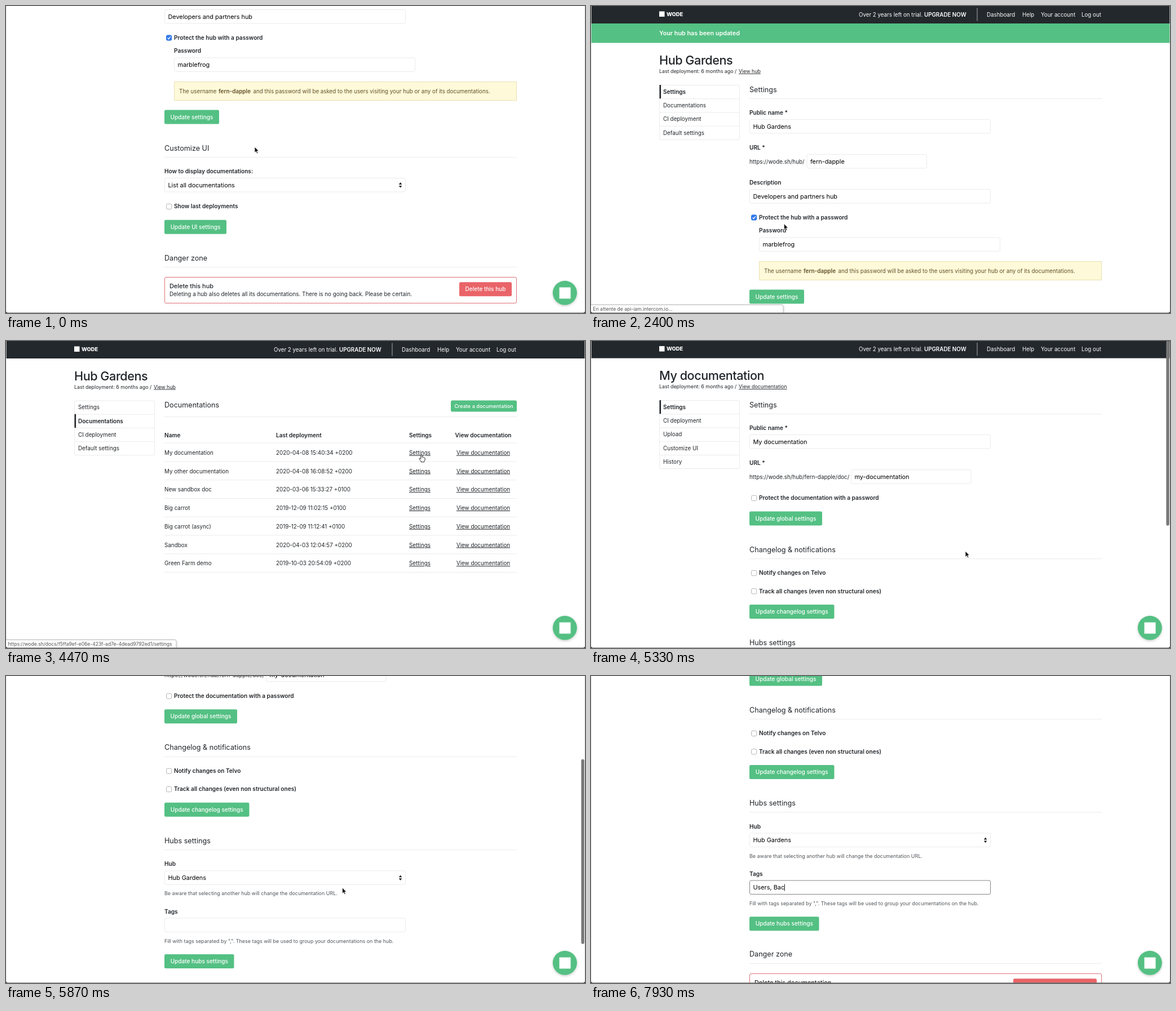
Animation of 1027 by 545 pixels, one loop 8 s. Source, as an HTML page:

```html
<!DOCTYPE html>
<html lang="en">
<head>
<meta charset="utf-8">
<title>Hub settings</title>
<style>
html, body { margin: 0; width: 100%; height: 100%; overflow: hidden; background: #fff; }
svg { display: block; width: 1027px; height: 545px; font-family: Inter, "Open Sans", sans-serif; font-optical-sizing: none; }
text { white-space: pre; fill: #212529; }
.cell { font-size: 9.85px; }
.field { font-size: 10.9px; fill: #000; }
.label { font-size: 10.15px; font-weight: 600; }
.head { font-size: 10.05px; font-weight: 600; }
.h1 { font-size: 21.6px; font-weight: 500; letter-spacing: -.45px; }
.h2 { font-size: 12.6px; }
.h3 { font-size: 10.9px; font-weight: 500; }
.sub { font-size: 8.85px; }
.hint { font-size: 8.95px; fill: #50565b; }
.note { font-size: 9.78px; fill: #62512a; }
.noteb { font-size: 9.95px; fill: #62512a; font-weight: 600; }
.body { font-size: 9.83px; }
.btn { font-size: 10.05px; font-weight: 500; fill: #fff; }
.mini { font-size: 9.13px; font-weight: 500; fill: #fff; }
.nav { font-size: 9.75px; fill: #fff; }
.navb { font-size: 9.8px; font-weight: 600; fill: #fff; }
.flash { font-size: 10.8px; font-weight: 600; fill: #fff; }
.brand { font-size: 9.4px; font-weight: 800; fill: #fff; }
.status { font-size: 8.55px; fill: #555; }
.u { text-decoration: underline; }
</style>
</head>
<body>
<svg id="stage" viewBox="0 0 1027 545"></svg>
<script>
const LOOP = 8000;
const GREEN = '#54c083', RED = '#e96468', LINE = '#ebebeb';
const HUB = 'Hub Gardens', SLUG = 'fern-dapple', SITE = 'https://wode.sh/';
const SIZE = { cell: 9.85, field: 10.9, label: 10.15, head: 10.05, h1: 21.6, h2: 12.6, h3: 10.9, sub: 8.85, hint: 8.95,
  note: 9.78, noteb: 9.95, body: 9.83, btn: 10.05, mini: 9.13, nav: 9.75, navb: 9.8, flash: 10.8, brand: 9.4, status: 8.55 };

const esc = s => s.replace(/&/g, '&amp;');

// y is the middle of the capitals
const text = (x, y, cls, s, extra = '') =>
  `<text x="${x}" y="${y + SIZE[cls.split(' ')[0]] * .364}" class="${cls}" ${extra}>${esc(s)}</text>`;
const box = (x, y, w, h, fill, extra = '') =>
  `<rect x="${x}" y="${y}" width="${w}" height="${h}" fill="${fill}" ${extra}/>`;
const rule = (y, x = 281, w = 625) => box(x, y, w, 1, LINE);
const frame = (x, y, w, h, id = '') =>
  box(x + .5, y + .5, w - 1, h - 1, '#fff', `rx="2.5" stroke="${LINE}" ${id && `id="${id}"`}`);
const input = (x, y, w, s, id) => frame(x, y, w, 25.5, id) + text(x + 6.4, y + 12.9, 'field', s, id ? `id="${id}Text"` : '');
const select = (y, s, id) => input(281, y, 428, s, id) +
  `<path d="M696.8 ${y + 11.9}h5.6l-2.8-3.8zM696.8 ${y + 13.9}h5.6l-2.8 3.8z" fill="#222"/>`;
const button = (x, y, w, s, { h = 25, fill = GREEN, cls = 'btn', id = '' } = {}) =>
  box(x, y, w, h, fill, `rx="2.5" ${id && `id="${id}"`}`) +
  text(x + w / 2, y + h / 2, cls, s, 'text-anchor="middle"');
const check = (y, s, on) => box(284.5, y - 4.3, 9.2, 9.2, on ? '#2f78e8' : '#fff', `rx="2" stroke="${on ? '#2f78e8' : '#b5b5b5'}"`) +
  (on ? `<path d="M286.6 ${y + .3}l1.9 2.2 3.4-4.6" fill="none" stroke="#fff" stroke-width="1.3"/>` : '') +
  text(298, y, 'label', s);
const section = (y, s) => text(281, y, 'h2', s) + rule(y + 16);

const header = () => box(0, 0, 1027, 31, '#23282c') + box(121, 9.5, 9.5, 9.5, '#fff') +
  text(134, 14.3, 'brand', 'WODE') +
  text(475, 15, 'nav', 'Over 2 years left on trial.') + text(591, 15, 'navb', 'UPGRADE NOW') +
  box(684.5, 3.5, 1, 23, '#a9acae') +
  text(702, 15, 'nav', 'Dashboard') + text(765, 15, 'nav', 'Help') +
  text(798, 15, 'nav', 'Your account') + text(870, 15, 'nav', 'Log out');

const title = (y, name, link) => text(121, y, 'h1', name) +
  text(121, y + 19.7, 'sub', 'Last deployment: 6 months ago /') + text(262, y + 19.7, 'sub u', link);

const sidebar = (y, items, active) => frame(121, y, 143, items.length * 24.25 + .8) + items.map((s, i) => {
  const top = y + i * 24.25, on = i === active;
  return (i ? rule(top, 122, 141) : '') + (on ? box(121.5, top, 2.6, 24.5, '#212529') : '') +
    text(128, top + 12.3, on ? 'head' : 'cell', s);
}).join('');

const danger = (y, s, x, w, more) => section(y, 'Danger zone') +
  box(281.5, y + 34.5, 624, 46, '#fff', 'rx="2.5" stroke="#de7176"') +
  text(290, y + 50, 'h3', s) + text(290, y + 64.7, 'body', more) +
  button(x, y + 43.3, w, s, { fill: RED });

const WARN = 'documentations. There is no going back. Please be certain.';

const hubPage = () => header() + box(0, 31, 1027, 34.5, GREEN) +
  text(121, 48.5, 'flash', 'Your hub has been updated') +
  title(96, HUB, 'View hub') +
  sidebar(140, ['Settings', 'Documentations', 'CI deployment', 'Default settings'], 0) +
  box(121.8, 162.2, 146, 28.5, 'none', 'id="ring" stroke="#777" stroke-width="2.2"') +
  section(148, 'Settings') +
  text(281, 189.3, 'label', 'Public name *') + input(281, 201, 428, HUB) +
  text(281, 251.5, 'label', 'URL *') + text(281, 276, 'cell', SITE + 'hub/') + input(382.5, 263, 213.5, SLUG) +
  text(281, 313.3, 'label', 'Description') + input(281, 325, 428, 'Developers and partners hub') +
  check(375.2, 'Protect the hub with a password', true) +
  text(298, 398.7, 'label', 'Password') + input(298, 410.4, 428, 'marblefrog') +
  box(298.5, 453.5, 607, 33, '#fef9d8', 'stroke="#e9e0b4"') +
  text(307, 470, 'note', 'The username') + text(377, 470, 'noteb', SLUG) +
  text(438.6, 470, 'note', 'and this password will be asked to the users visiting your hub or any of its documentations.') +
  button(281, 503.4, 97, 'Update settings') +
  section(571, 'Customize UI') +
  text(281, 612.5, 'label', 'How to display documentations:') + select(624, 'List all documentations', 'display') +
  check(674.7, 'Show last deployments', false) +
  button(281, 698.7, 110, 'Update UI settings', { id: 'save' }) +
  danger(766, 'Delete this hub', 804, 93, 'Deleting a hub also deletes all its ' + WARN);

const ROWS = [
  ['My documentation', '2020-04-08 15:40:34 +0200'],
  ['My other documentation', '2020-04-08 16:08:52 +0200'],
  ['New sandbox doc', '2020-03-06 15:33:27 +0100'],
  ['Big carrot', '2019-12-09 11:02:15 +0100'],
  ['Big carrot (async)', '2019-12-09 11:12:41 +0100'],
  ['Sandbox', '2020-04-03 12:04:57 +0200'],
  ['Green Farm demo', '2019-10-03 20:54:09 +0200'],
];
const MID = 'text-anchor="middle"';

const listPage = () => header() + title(61.7, HUB, 'View hub') +
  sidebar(105.5, ['Settings', 'Documentations', 'CI deployment', 'Default settings'], 1) +
  text(281, 113.7, 'h2', 'Documentations') + rule(134) +
  button(789, 105.5, 117, 'Create a documentation', { h: 20, cls: 'mini' }) +
  text(281, 167, 'head', 'Name') + text(479, 167, 'head', 'Last deployment') +
  text(715, 167, 'head', 'Settings') + text(846.5, 167, 'head', 'View documentation', MID) + rule(180.5) +
  ROWS.map(([name, date], i) => {
    const y = 198.2 + i * 32.75;
    return text(281, y, 'cell', name) + text(479, y, 'cell', date) + text(715, y, 'cell u', 'Settings') +
      text(846.5, y, 'cell u', 'View documentation', MID) + rule(y + 15.3);
  }).join('');

const docPage = () => header() + title(61.7, 'My documentation', 'View documentation') +
  sidebar(105.5, ['Settings', 'CI deployment', 'Upload', 'Customize UI', 'History'], 0) +
  section(113.5, 'Settings') +
  text(281, 155.2, 'label', 'Public name *') + input(281, 166.4, 428, 'My documentation') +
  text(281, 217.2, 'label', 'URL *') + text(281, 242, 'cell', `${SITE}hub/${SLUG}/doc/`) +
  input(461, 228.6, 213.5, 'my-documentation') +
  check(279, 'Protect the documentation with a password', false) +
  button(281, 303, 129, 'Update global settings') +
  section(370.6, 'Changelog & notifications') +
  check(412.2, 'Notify changes on Telvo', false) +
  check(444.5, 'Track all changes (even non structural ones)', false) +
  button(281, 468.4, 150.5, 'Update changelog settings') +
  section(535.8, 'Hubs settings') +
  text(281, 577.5, 'label', 'Hub') + select(589, HUB) +
  text(281, 629.8, 'hint', 'Be aware that selecting another hub will change the documentation URL.') +
  text(281, 661.6, 'label', 'Tags') + input(281, 673, 428, '', 'tags') +
  box(287, 680, 1, 12, '#000', 'id="caret"') +
  text(281, 714, 'hint', 'Fill with tags separated by ",". These tags will be used to group your documentations on the hub.') +
  button(281, 737.7, 123.5, 'Update hubs settings') +
  danger(804.4, 'Delete this documentation', 749, 148, 'Deleting a documentation is definitive. There is no going back.');

const OPTIONS = ['List all documentations', 'Group documentations by tag'];
const popup = () => `<g id="popup">` +
  box(273, 306, 431.5, 46, '#f2f2f2', 'rx="4.5" stroke="#c9c9c9" stroke-width=".7" filter="url(#soft)"') +
  box(273, 310, 431.5, 19, '#2f7bf0', 'id="pick"') +
  OPTIONS.map((s, i) => text(287.4, 319 + i * 19, 'field', s, `id="opt${i}"`)).join('') +
  `<path id="tick" d="M277.5 319l2.2 3 4-6.6" fill="none" stroke="#fff" stroke-width="1.4"/></g>`;

const overlay = () => `<rect id="thumb" x="1020.3" width="5.4" height="328" rx="2.7" fill="#787878"/>
  <g id="chat"><circle cx="991.3" cy="509.3" r="21.5" fill="${GREEN}" filter="url(#soft)"/>${box(981.5, 499.5, 20, 20, '#fff')}</g>` +
  box(0, 0, .8, 545, '#dcdcdc') + box(1026.3, 0, .7, 545, '#dcdcdc') +
  `<g id="status">${box(-3, 530.5, 344, 20, '#fff', 'id="bar" rx="2.5" stroke="#b9b9b9" filter="url(#soft)"')}
  ${text(3.5, 538, 'status', '', 'id="statusText"')}</g>` +
  box(0, 544.2, 1027, .8, '#777') +
  `<path d="M0 541Q0 545 4 545H0zM1027 541Q1027 545 1023 545H1027z" fill="#111"/>
  <g id="cursor">
    <path id="arrow" d="M0 0V10.4L2.5 8.2 4.1 12 5.9 11.2 4.3 7.6H7.4Z" fill="#111" stroke="#fff" stroke-width=".8"/>
    <path id="hand" d="M-1.2.6Q0-.8 1.1.6V4.3Q2.4 3.6 3 4.8 4.2 4.2 4.7 5.4 6 5 6.1 6.6V9.2Q5.6 10.8 4.9 11.7V13H-.9V11.8Q-2.2 10.3-3.9 7.6-4.2 6.1-2.6 6.2L-1.2 7.6Z" fill="#fff" stroke="#222" stroke-width="1"/>
    <path id="beam" d="M-2.2-5.3Q0-5.3 0-3.8 0-5.3 2.2-5.3M0-4V4M-2.2 5.3Q0 5.3 0 3.8 0 5.3 2.2 5.3" fill="none" stroke="#222" stroke-width="1.1"/>
  </g>`;

document.getElementById('stage').innerHTML =
  `<defs><filter id="soft" x="-30%" y="-30%" width="160%" height="170%">
    <feDropShadow dx="0" dy="1.5" stdDeviation="2" flood-opacity=".22"/></filter></defs>
  <rect width="1027" height="545" fill="#fff"/>
  <g id="hub">${hubPage()}</g><g id="list">${listPage()}</g><g id="doc">${docPage()}</g>${popup()}${overlay()}`;

const el = {};
document.querySelectorAll('[id]').forEach(n => el[n.id] = n);

const show = (n, on) => n.setAttribute('visibility', on ? 'visible' : 'hidden');
const smooth = k => k * k * (3 - 2 * k);

// keys are [time, value, value...]
function track(keys, t, ease = smooth) {
  let i = keys.findIndex(k => k[0] > t);
  if (i < 0) return keys[keys.length - 1].slice(1);
  if (!i) return keys[0].slice(1);
  const a = keys[i - 1], b = keys[i], p = ease((t - a[0]) / (b[0] - a[0]));
  return a.slice(1).map((v, j) => v + (b[j + 1] - v) * p);
}
const stage = (steps, t) => steps.reduce((v, [at, next]) => t >= at ? next : v, null);

const POINTER = [[30, 441, 250], [330, 428, 318], [820, 428, 318], [1000, 424, 336], [1260, 424, 336],
  [1700, 346.3, 392], [2340, 346.3, 392], [2980, 188.5, 174.3], [3610, 188.5, 174.3], [4450, 737, 201.8],
  [4760, 737, 201.8], [5300, 664, 373], [5620, 664, 373], [6300, 445, 382], [6330, 445, 382], [6400, 436, 377]];
const SHAPE = [[0, 'arrow'], [1600, 'hand'], [2070, 'arrow'], [2800, 'hand'], [3760, 'arrow'],
  [4330, 'hand'], [4930, 'arrow'], [6130, 'beam'], [6930, '']];
const SCROLL = [[5330, 0], [5600, 123], [5930, 270], [6200, 310.5]];
const PAGE = [[0, 'hub'], [3470, 'list'], [4930, 'doc']];
const WAIT = 'En attente de api-iam.intercom.io...';
const LINK = SITE + 'docs/f5ffa9ef-e06e-423f-ad7e-4dead9792ed1/settings';
const STATUS = [[0, ''], [2130, WAIT], [3470, ''], [4330, LINK], [4930, '']];
const CHAT = [[2069, 1], [2070, 0], [2530, 0], [2730, 1], [3469, 1], [3470, 0], [3870, 0], [4070, 1],
  [4929, 1], [4930, 0], [5130, 0], [5330, 1]];
const KEYS = [6870, 7070, 7200, 7270, 7330, 7470, 7530, 7670, 7800, 7930];
const TYPED = 'Users, Bac';

function draw(t) {
  const page = stage(PAGE, t);
  for (const id of ['hub', 'list', 'doc']) el[id].style.display = id === page ? '' : 'none';

  el.hub.setAttribute('transform', `translate(0 ${t < 2070 ? -319 : 0})`);
  show(el.ring, t >= 3270 && page === 'hub');
  el.display.setAttribute('stroke', t < 260 || t >= 2070 ? LINE : t < 530 ? '#aaa' : '#737373');
  el.displayText.textContent = OPTIONS[t < 1200 ? 0 : 1];
  el.save.setAttribute('fill', t >= 1600 && t < 2070 ? '#48a671' : GREEN);

  const open = t >= 530 && t < 1260, second = t >= 930;
  el.popup.style.display = open ? '' : 'none';
  el.pick.setAttribute('y', second ? 329 : 310);
  el.opt0.style.fill = second ? '#111' : '#fff';
  el.opt1.style.fill = second ? '#fff' : '#111';
  el.tick.setAttribute('stroke', second ? '#222' : '#fff');

  const [scroll] = track(SCROLL, t, k => k);
  el.doc.setAttribute('transform', `translate(0 ${-scroll})`);
  el.thumb.setAttribute('y', scroll * .608 - .5);
  show(el.thumb, t >= 5330 && t < 6400);
  el.tags.setAttribute('stroke', t < 6200 ? LINE : t < 6600 ? '#aaa' : '#858585');
  el.tagsText.textContent = TYPED.slice(0, KEYS.filter(k => t >= k).length);
  if (page === 'doc') el.caret.setAttribute('x', 287 + el.tagsText.getComputedTextLength());
  el.caret.style.display = t >= 6600 ? '' : 'none';

  const status = stage(STATUS, t);
  el.status.style.display = status ? '' : 'none';
  el.statusText.textContent = status;
  el.bar.setAttribute('width', status === LINK ? 305 : 344);
  el.chat.setAttribute('opacity', track(CHAT, t)[0]);

  const [x, y] = track(POINTER, t), shape = stage(SHAPE, t);
  el.cursor.setAttribute('transform', `translate(${x} ${y})`);
  for (const id of ['arrow', 'hand', 'beam']) show(el[id], id === shape);
}

const start = performance.now();
function tick() {
  draw((performance.now() - start) % LOOP);
  requestAnimationFrame(tick);
}
tick();
</script>
</body>
</html>
```
